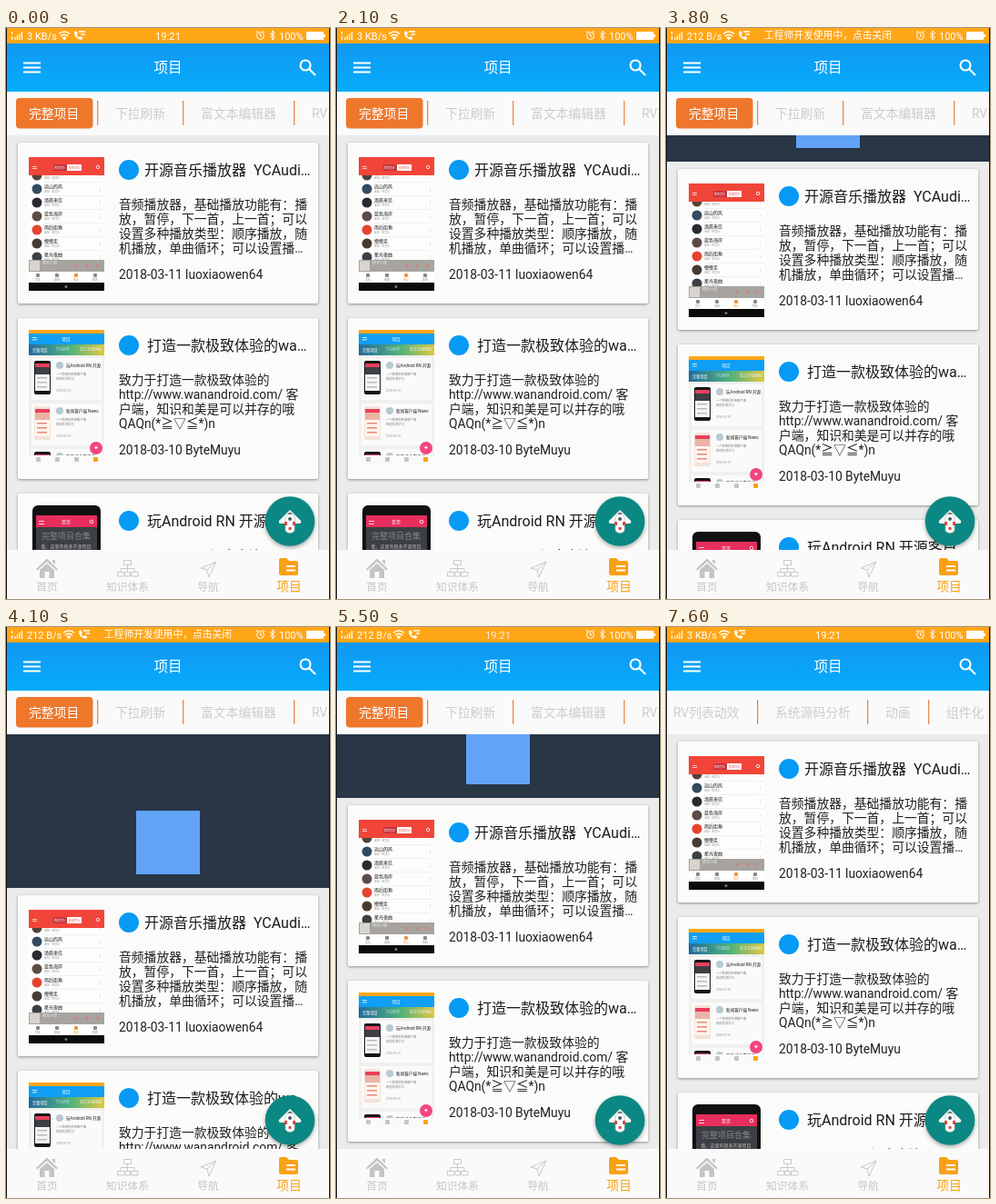
Animation, 356 px wide and 628 px high, one loop 8 s. Source, as an HTML page:

```html
<!DOCTYPE html>
<html lang="zh-CN">
<head>
<meta charset="utf-8">
<title>项目</title>
<style>
html, body { margin: 0; width: 100%; height: 100%; overflow: hidden; background: #ebebeb; }
svg { display: block; }
text { font-family: Roboto, "Noto Sans CJK SC", "Noto Sans CJK", sans-serif; white-space: pre; }
.mid { text-anchor: middle; }
.line { fill: none; stroke: currentColor; }
.card { fill: #fbfcfa; filter: drop-shadow(0 1px 1.5px #0006); }
.fab { fill: #0b8883; filter: drop-shadow(0 2px 2px #0005); }
</style>
</head>
<body>
<svg id="stage" width="356" height="628" viewBox="0 0 356 628">
  <defs>
    <linearGradient id="sky" x2="0" y2="1">
      <stop stop-color="#1298f3"/><stop offset="1" stop-color="#04acfb"/>
    </linearGradient>
    <linearGradient id="rainbow">
      <stop stop-color="#236b9d"/><stop offset=".55" stop-color="#50b27b"/><stop offset="1" stop-color="#e2c83e"/>
    </linearGradient>
    <clipPath id="body"><rect y="118" width="356" height="456"/></clipPath>
    <clipPath id="slot"><rect x="140" y="-200" width="80" height="154"/></clipPath>
  </defs>

  <rect width="356" height="628" fill="#ebebeb"/>
  <g clip-path="url(#body)">
    <g id="list"></g>
    <rect id="sheet" y="118" width="356" height="0" fill="#283645"/>
    <g id="drop">
      <rect x="143" y="-85" width="70" height="70" fill="#62a3f8"/>
      <g clip-path="url(#slot)">
        <g id="doc">
          <path d="M163 0H185L193 8V36H163Z" fill="#fbc550"/>
          <path d="M185 0V8H193Z" fill="#e0a13a"/>
          <path d="M168 12H187M168 17H187M168 22H187M168 27H187" stroke="#d9983a" stroke-width="1.3"/>
        </g>
      </g>
    </g>
  </g>

  <rect y="70" width="356" height="48" fill="#fafafa"/>
  <g id="tabs"></g>

  <rect y="17" width="356" height="53" fill="url(#sky)"/>
  <path d="M19 38.5H38M19 43.5H38M19 48.5H38" stroke="#fff" stroke-width="2"/>
  <g class="line" color="#fff" stroke-width="2.1"><circle cx="329" cy="41" r="5.5"/><path d="M333 45L340 52"/></g>

  <rect width="356" height="17" fill="#ffa617"/>
  <g class="line" color="#fff">
    <path d="M6.500 4V7M6.500 9V13M10 10V13M12.500 8V13M15 6V13M17.500 4V13" stroke-width="1.2"/>
    <g id="net">
      <path d="M58 6.500Q64 1.500 70 6.500M60 9Q64 5.500 68 9" stroke-width="1.6"/>
      <path d="M61.500 10.500Q64 8.500 66.500 10.500L64 13.500Z" fill="#fff" stroke="none"/>
      <path d="M75 4Q75 12 83 13L84.500 10.500L81.500 9L80 10.500Q78.500 9.500 77.700 7.500L79 6L77.500 3.500Z" fill="#fff" stroke="none"/>
      <path d="M80 4H87M82.500 7H87" stroke-width="1.5"/>
    </g>
    <circle cx="279.500" cy="8.500" r="4"/><path d="M279.500 6V9H281.500M275 5L277 3M284 5L282 3"/>
    <path d="M290 5.500L295.500 10.500L292.700 13V3L295.500 5.500L290 10.500"/>
  </g>
  <path d="M330 4H349V13H330ZM349 7H351V10H349Z" fill="#fff"/>
  <g id="status"></g>

  <g id="fab">
    <circle class="fab" cx="312" cy="542.5" r="27.3"/>
    <path d="M312 530L324 542Q325 545 322 545H302Q299 545 300 542Z" fill="#f8f8f8"/>
    <path d="M307 538Q312 529 317 538V553Q312 558 307 553Z" fill="#fff" stroke="#a9b5b5" stroke-width=".7"/>
    <path d="M309 535Q312 530 315 535Z" fill="#777"/>
    <circle cx="312" cy="540" r="2" fill="#4b5961"/>
    <path d="M306 543H309V547H306ZM315 543H318V547H315ZM310.500 549H313.500V552H310.500Z" fill="#d74b40"/>
  </g>

  <rect y="574" width="356" height="54" fill="#fafafa"/>
  <g fill="#c4c4c4">
    <path d="M33 595L45 583.500L57 595L55.500 596.500L45 587L34.500 596.500ZM51 585H54V590L51 587Z"/>
    <path d="M37 596L45 589L53 596V605H47.500V598H42.500V605H37Z"/>
  </g>
  <g class="line" color="#c9c9c9">
    <path d="M129.500 585.500H137.500V590.500H129.500ZM122.500 598.500H130V603H122.500ZM130.800 598.500H136.200V603H130.800ZM137.500 598.500H145V603H137.500ZM133.500 590.500V598M126 598V594.500H141V598"/>
    <path d="M214 594L231 587L223 604L221 596ZM221 596L231 587"/>
  </g>
  <path d="M300 585Q300 583 302 583H308L311 586H319Q321 586 321 588V600Q321 602 319 602H302Q300 602 300 600Z" fill="#f9a114"/>
  <path d="M308 592H318M308 596.500H318" stroke="#fff" stroke-width="1.800"/>
  <g id="nav"></g>
  <path d="M.5 0V628M355.500 0V628" stroke="#111"/>
</svg>

<script>
const $ = id => document.getElementById(id);
const rect = (x, y, w, h, fill, r = 0) =>
  `<rect x="${x}" y="${y}" width="${w}" height="${h}" rx="${r}" fill="${fill}"/>`;
const dot = (x, y, r, fill) => `<circle cx="${x}" cy="${y}" r="${r}" fill="${fill}"/>`;
// y is the middle of the line
const text = (x, y, size, fill, str, extra = "") =>
  `<text x="${x}" y="${Math.round(y + size * 0.37)}" font-size="${size}" fill="${fill}" ${extra}>${str}</text>`;
const MID = 'class="mid"';

function musicThumb() {
  const names = ["晴天小调", "远山的风", "清晨来信", "蓝色海岸", "雨后街角", "慢慢走", "星光夜曲"];
  const tints = ["#54433b", "#334a60", "#2a2a30", "#5d4b45", "#e5432f", "#463b32", "#3a4044"];
  let s = rect(0, 0, 83, 147, "#fdfdfd");
  names.forEach((n, i) => {
    const y = 20 + i * 15;
    s += dot(9, y, 5.5, tints[i]) + text(17, y - 2.5, 5, "#111", n) +
      text(17, y + 3, 3, "#999", "未知 - 轻音乐") + text(76, y, 5, "#888", "⋮") +
      rect(17, y + 7, 66, 0.4, "#ddd");
  });
  s += rect(0, 0, 83, 20, "#f24539") + rect(27, 8, 15, 7, "#c9323b") + rect(42, 8, 16, 7, "#fff") +
    text(34, 11.5, 3, "#fff", "我的音乐", MID) + text(50, 11.5, 3, "#e44", "在线音乐", MID) +
    rect(4, 10, 5, 0.7, "#fff") + rect(4, 12, 5, 0.7, "#fff") +
    '<circle cx="76" cy="11" r="1.7" fill="none" stroke="#fff" stroke-width=".8"/>' +
    rect(0, 113, 83, 13, "#a7a39f") + rect(1, 114, 11, 11, "#d8d3cd") + text(15, 117, 4, "#eee", "晴天小调") +
    [53, 64, 75].map(x => dot(x, 119.5, 1.8, "#c98680")).join("") +
    rect(0, 126, 83, 12, "#fff");
  ["音乐", "视频", "笔记", "我的"].forEach((n, i) => {
    const x = 10 + i * 21, c = i == 2 ? "#e9963c" : "#888";
    s += rect(x - 2, 128, 4, 4, c, 1) + text(x, 135, 3, c, n, MID);
  });
  return s + rect(0, 138, 83, 9, "#0b0b0b") + dot(41, 142.5, 1.5, "#777");
}

function clientThumb() {
  let s = rect(0, 0, 83, 150, "#f0f0ef") + rect(0, 0, 83, 4, "#ffa617") +
    rect(0, 4, 83, 12, "#109ff4") + rect(0, 16, 83, 12, "url(#rainbow)") +
    text(41, 10, 4.5, "#fff", "项目", MID) + rect(4, 8, 5, 0.8, "#fff") + rect(4, 10.5, 5, 0.8, "#fff") +
    text(4, 22, 4.2, "#fff", "完整项目") + text(29, 22, 4, "#cde", "下拉刷新") + text(56, 22, 4, "#eee", "富文本编辑器");
  [["玩Android RN 开源", "#3c3f43"], ["新闻客户端 News", "#eab3a4"], ["影音综合客户端", "#3c3f43"]].forEach(([t, c], i) => {
    const y = 31 + i * 50, light = i == 1;
    s += rect(3, y, 77, 46, "#fafafa") + rect(6, y + 3, 18, 37, light ? "#f2e3d9" : "#16161a", 2) +
      rect(7, y + 6, 16, 4, "#ea3f5e") + rect(7, y + 10, 16, 26, light ? "#fff4ed" : "#f6f6f8") +
      rect(7, y + 10, 16, 8, c);
    for (let k = 0; k < 3; k++) s += rect(9, y + 21 + k * 5, 11, 1.5, light ? "#e58a78" : "#bbb");
    s += dot(34, y + 8, 4, "#b7c9d1") + text(41, y + 8, 4.6, "#222", t) +
      text(30, y + 18, 3.3, "#777", "一个简单的开源客户端") + text(30, y + 23, 3.3, "#777", "欢迎交流学习") +
      text(30, y + 36, 3.2, "#999", "2018-03-10");
  });
  s += rect(0, 138, 83, 12, "#fafafa") + dot(74, 130, 7, "#f2457e") + text(74, 129.5, 7, "#fff", "✦", MID);
  for (let i = 0; i < 4; i++) s += rect(8 + i * 21, 140, 5, 5, i == 3 ? "#f9a114" : "#c4c4c4", 1);
  return s;
}

function phoneThumb() {
  return rect(4, 0, 75, 150, "#111114", 6) + rect(8, 11, 67, 130, "#f7f7f7") +
    rect(8, 11, 67, 13, "#e72e5d") + rect(11, 17, 6, 0.8, "#fff") + rect(11, 20, 6, 0.8, "#fff") +
    text(41, 18, 5, "#fff", "首页", MID) +
    '<circle cx="69" cy="18" r="1.800" fill="none" stroke="#fff" stroke-width=".8"/>' +
    rect(8, 24, 67, 36, "#3c3f43") + text(41, 34, 9, "#85888b", "完整项目合集", MID) +
    text(41, 45, 5, "#bbb", "看，这里有很多开源项目", MID);
}

const cards = [
  { thumb: musicThumb, tx: 152, title: "开源音乐播放器  YCAudi…",
    lines: ["音频播放器，基础播放功能有：播", "放，暂停，下一首，上一首；可以", "设置多种播放类型：顺序播放，随", "机播放，单曲循环；可以设置播…"],
    date: "2018-03-11 luoxiaowen64" },
  { thumb: clientThumb, tx: 155, title: "打造一款极致体验的wa…",
    lines: ["致力于打造一款极致体验的", "http://www.wanandroid.com/ 客", "户端，知识和美是可以并存的哦", "QAQn(*≧▽≦*)n"],
    date: "2018-03-10 ByteMuyu" },
  { thumb: phoneThumb, tx: 155, title: "玩Android RN 开源客户…",
    lines: ["玩Android RN 开源客户端"], date: "" }
];
$("list").innerHTML = cards.map((c, i) =>
  `<g transform="translate(0 ${126 + i * 193})">
    <rect class="card" x="13" width="330" height="177" rx="2"/>
    <svg x="25" y="${i ? 13 : 16}" width="83" height="${i ? 150 : 147}">${c.thumb()}</svg>` +
    dot(135, 30, 11, "#069af5") + text(c.tx, 30, 16, "#1b1b1b", c.title) +
    c.lines.map((l, k) => text(124, 67.5 + k * 16, 13.8, "#1f1f1f", l)).join("") +
    text(124, 145, 13.8, "#1f1f1f", c.date) + "</g>").join("");

const tabs = [[120, "下拉刷新"], [214, "富文本编辑器"], [336, "RV列表动效"], [448, "系统源码分析"], [569, "动画"], [636, "组件化"]];
$("tabs").innerHTML = rect(11, 77, 84.5, 33.5, "#ee772b", 4) + text(25, 94, 13.8, "#fff", "完整项目") +
  tabs.map(([x, t]) => rect(x - 20, 80, 1.3, 27, "#e88a50") + text(x, 94, 13.8, "#ccc", t)).join("");

$("nav").innerHTML = [[45, "首页"], [133.5, "知识体系"], [222, "导航"]]
  .map(([x, t]) => text(x, 614.5, 11.8, "#c6c6c6", t, MID)).join("") +
  text(311, 614, 13.8, "#f9a114", "项目", MID);

$("status").innerHTML = text(23, 8.5, 11, "#fff", "3 KB/s", 'id="speed"') +
  text(178, 8.5, 11.2, "#fff", "19:21", 'id="clock" class="mid"') +
  text(178, 8.5, 10.8, "#fff", "工程师开发使用中，点击关闭", 'id="notice" class="mid"') +
  text(300, 8.5, 11, "#fff", "100%") + text(178, 43.5, 15.6, "#fff", "项目", MID);

// [ms, value] pairs, linear between
function track(keys, t) {
  if (t <= keys[0][0]) return keys[0][1];
  for (let i = 1; i < keys.length; i++) {
    const [t0, a] = keys[i - 1], [t1, b] = keys[i];
    if (t <= t1) return a + (b - a) * (t - t0) / (t1 - t0);
  }
  return keys[keys.length - 1][1];
}

const pullKeys = [[3700, 0], [3800, 29], [3900, 85], [4000, 135], [4100, 169], [4300, 182], [4400, 184],
  [4600, 156], [4700, 148], [5300, 148], [5400, 128], [5500, 70], [5600, 20], [5700, 0]];
const tabKeys = [[6500, 0], [6600, 19], [6900, 19], [7000, 70], [7100, 150], [7200, 220],
  [7300, 270], [7400, 302], [7500, 320], [7600, 328]];
const docKeys = [[4800, -240], [5200, -73], [5300, -40]];
const clockKeys = [[1500, 1], [2100, 0], [5100, 0], [5600, 1]];
const noticeKeys = [[2300, 0], [2700, 1], [4200, 1], [4800, 0]];

function draw(now) {
  const t = Math.floor(now % 8000 / 100) * 100;   // ten pictures a second
  const pull = track(pullKeys, t);
  $("list").setAttribute("transform", `translate(0 ${pull})`);
  $("sheet").setAttribute("height", pull);
  $("drop").setAttribute("transform", `translate(0 ${118 + pull})`);
  $("drop").setAttribute("visibility", pull ? "visible" : "hidden");
  $("doc").setAttribute("transform", `translate(0 ${track(docKeys, t)})`);
  $("tabs").setAttribute("transform", `translate(${-track(tabKeys, t)} 0)`);
  $("clock").setAttribute("opacity", track(clockKeys, t));
  $("notice").setAttribute("opacity", track(noticeKeys, t));
  const busy = t >= 2900 && t < 5700;
  $("speed").textContent = busy ? "212 B/s" : "3 KB/s";
  $("net").setAttribute("transform", `translate(${busy ? 5 : 0} 0)`);
  requestAnimationFrame(draw);
}
draw(performance.now());
</script>
</body>
</html>
```
